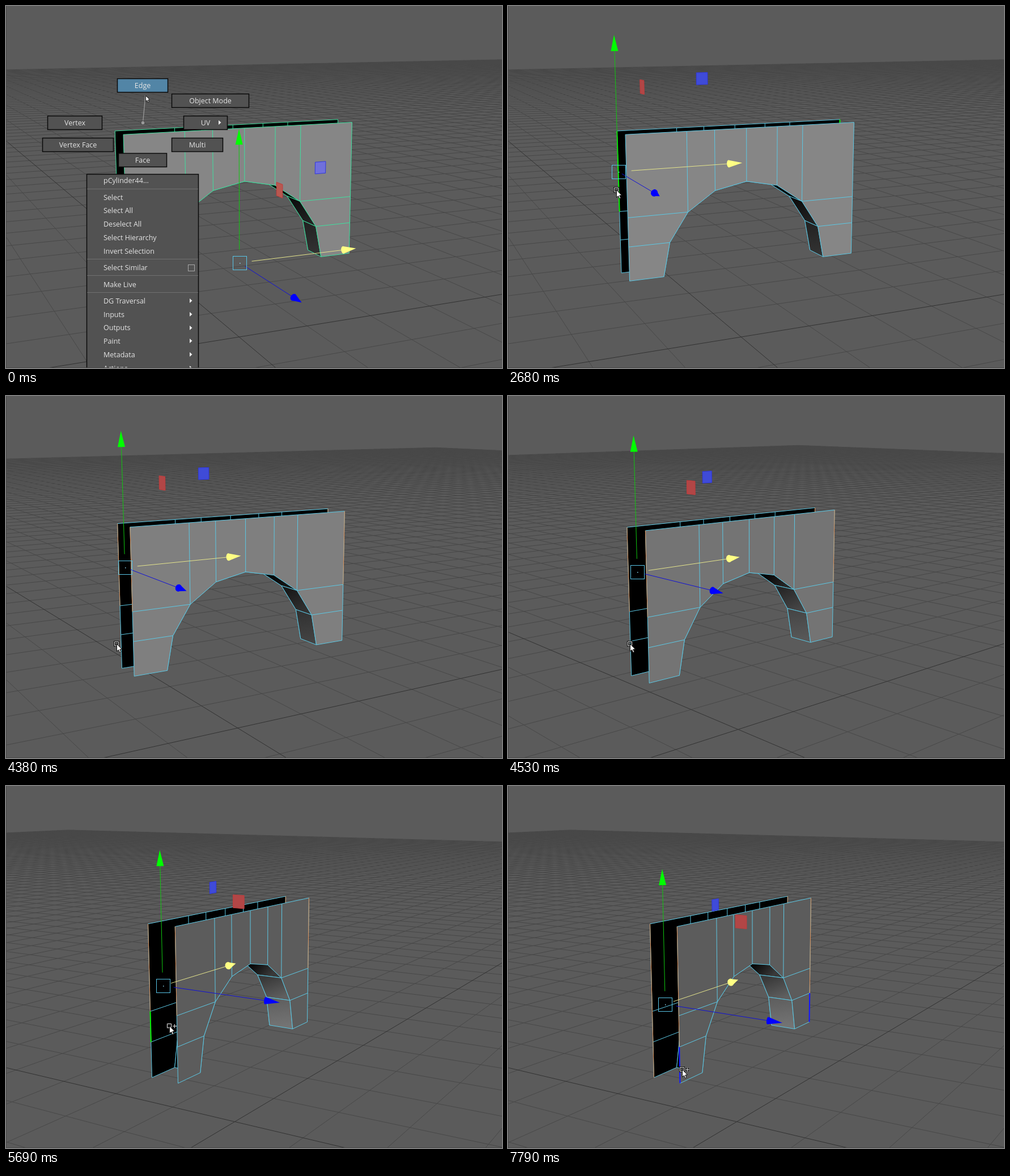
Recreate the animation shown at these times as an HTML page with a canvas. Size 875 by 640 pixels, loop 8000 ms.

```html
<!DOCTYPE html>
<html lang="en">
<head>
<meta charset="utf-8">
<title>Edge selection</title>
<style>
html, body { margin: 0; width: 875px; height: 640px; overflow: hidden; background: #5b5b5b; }
canvas { display: block; }
</style>
</head>
<body>
<canvas id="stage" width="875" height="640"></canvas>
<script>
const ctx = document.getElementById('stage').getContext('2d');
const { sin, cos, min, max, floor, round, PI } = Math;
const LOOP = 8000, MENU_END = 1230, PICK_START = 2680, ORBIT = [4140, 4680];

// World units are grid cells; points are [x, y up, w away], measured from the orbit pivot.
const FOCAL = 1482, DISTANCE = 10.42, GRID = 71, FLOOR = -2.04, ORIGIN = [-.11, .22];
const CENTER = -.14, HALF = 1.508, LEFT = CENTER - HALF, RIGHT = CENTER + HALF;
const TOP = .733, BASE = -1.01, RADIUS = 1.085;
const DEPTH = { front: -.038, back: .325 };

// Cursor strokes: start, end, x, y
const strokes = [
  [0, 0, 246, 158], [120, 390, 247, 141], [1630, 2000, 191, 325], [2830, 3340, 209, 354],
  [3610, 4000, 192, 392], [4140, 4380, 195, 438], [4530, 4680, 235, 438], [4830, 5220, 248, 425],
  [5690, 5690, 288, 424], [5840, 5840, 301, 431], [6650, 6960, 252, 490], [7510, 7790, 307, 501]
];
const hovers = [
  [0], [1750, 'front', 'top'], [1880, 'back', 'top'], [2830], [3100, 'front', 'top'], [3730],
  [5100, 'back', 'mid'], [5840, 'front', 'mid'], [6500, 'front', 'mid', '#1414ff'],
  [6650, 'back', 'inner'], [6800, 'back', 'low'], [7510, 'back', 'inner'],
  [7660, 'front', 'low'], [7790, 'front', 'low', '#1414ff']
];
const picks = [
  [PICK_START, 'back', 'top'], [3610, 'front', 'top'], [5690, 'back', 'mid'],
  [6650, 'front', 'mid'], [7360, 'back', 'low']
];

// Half of a 16-sided cylinder cut out of a block, clockwise from the top left
const range = (from, to) => Array.from({ length: Math.abs(to - from) + 1 }, (_, i) => from + i * Math.sign(to - from));
const archPoint = k => [CENTER + RADIUS * sin(k * PI / 8), BASE + RADIUS * cos(k * PI / 8)];
const sideHeights = [2, 3, 4].map(k => archPoint(k)[1]);
const outline = [
  [LEFT, TOP], ...range(-2, 2).map(k => [archPoint(k)[0], TOP]), [RIGHT, TOP],
  ...sideHeights.map(y => [RIGHT, y]),
  ...range(4, -4).map(archPoint),
  ...sideHeights.map(y => [LEFT, y]).reverse()
];
const creases = [[1, 16], [2, 15], [3, 14], [4, 13], [5, 12], [12, 7], [11, 8], [21, 16], [20, 17]];
const edgePairs = { // left edge and its mirror
  top: [[0, 21], [6, 7]], mid: [[21, 20], [7, 8]], low: [[20, 19], [8, 9]], inner: [[17, 18], [11, 10]]
};

function stepped(t, start, end) {
  if (t < start) return 0;
  const last = round((end - start) / 135);
  const step = floor((t - start) / max(1, end - start) * last + .25);
  return min(1, (step + 1) / (last + 1));
}
function cursorAt(t) {
  return strokes.reduce(([x, y], [start, end, toX, toY]) => {
    const k = stepped(t, start, end);
    return [x + (toX - x) * k, y + (toY - y) * k];
  }, [0, 0]);
}

let camera;
function setCamera(t) {
  const turn = stepped(t, ...ORBIT) ** 3;
  const yaw = (65.8 - 34.2 * turn) * PI / 180, pitch = (10.81 + .69 * turn * turn) * PI / 180;
  camera = { sy: sin(yaw), cy: cos(yaw), sp: sin(pitch), cp: cos(pitch), centerY: 318 + 3 * turn };
}
function toView([x, y, w]) {
  const { sy, cy, sp, cp } = camera;
  const ahead = x * cy + w * sy;
  return [x * sy - w * cy, y * cp + ahead * sp, DISTANCE + ahead * cp - y * sp];
}
const toScreen = ([x, y, d]) => [437 + FOCAL * x / d, camera.centerY - FOCAL * y / d];
const project = p => toScreen(toView(p));

const gray = n => `rgb(${n},${n},${n})`;
const middle = (a, b) => [(a[0] + b[0]) / 2, (a[1] + b[1]) / 2];

function path(points, close) {
  ctx.beginPath();
  points.forEach(p => ctx.lineTo(...p));
  if (close) ctx.closePath();
}
function stroke(color, width = 1) {
  ctx.strokeStyle = color;
  ctx.lineWidth = width;
  ctx.stroke();
}
function line(a, b, color, width) {
  path([a, b]);
  stroke(color, width);
}
function fill(points, color) {
  path(points, true);
  ctx.fillStyle = color;
  ctx.fill();
}

function drawGround() {
  const near = .5;
  const clip = (p, q) => {
    if (p[2] >= near) return p;
    const k = (near - p[2]) / (q[2] - p[2]);
    return p.map((n, i) => n + (q[i] - n) * k);
  };
  const addLine = (...ends) => {
    const [p, q] = ends.map(([x, w]) => toView([x + ORIGIN[0], FLOOR, w + ORIGIN[1]]));
    if (max(p[2], q[2]) < near) return;
    ctx.moveTo(...toScreen(clip(p, q)));
    ctx.lineTo(...toScreen(clip(q, p)));
  };
  const addCross = i => {
    addLine([i, -GRID], [i, GRID]);
    addLine([-GRID, i], [GRID, i]);
  };
  ctx.beginPath();
  for (let i = 1; i <= GRID; i++) {
    addCross(i);
    addCross(-i);
  }
  stroke('#484848');
  ctx.beginPath();
  addCross(0);
  stroke('#323232');
}

function drawArch(t) {
  const wire = t < MENU_END ? '#3fe0a0' : '#5cc8e4';
  const sheet = side => outline.map(([x, y]) => project([x, y, DEPTH[side]]));
  const front = sheet('front'), back = sheet('back');
  const [, hoverSide, hoverPart, hoverColor = '#00f000'] = hovers.filter(h => h[0] <= t).pop();

  const drawSheet = (points, side, color) => {
    fill(points, color);
    stroke(wire);
    creases.forEach(([a, b]) => line(points[a], points[b], wire));
    const mark = (part, markColor, width) =>
      edgePairs[part].forEach(([a, b]) => line(points[a], points[b], markColor, width));
    picks.filter(p => p[0] <= t && p[1] === side).forEach(p => mark(p[2], '#dd9058'));
    if (hoverSide === side) mark(hoverPart, hoverColor, 2);
  };
  const soffitGray = k => {
    const { sp, cp, cy } = camera;
    const facing = sin(k * PI / 8) * cy * cp - cos(k * PI / 8) * sp;
    return gray(max(0, 152 * facing - 11));
  };

  drawSheet(back, 'back', '#000');
  for (let k = -4; k < 4; k++) {
    const i = 14 - k, j = i - 1;
    const shade = ctx.createLinearGradient(...middle(back[i], front[i]), ...middle(back[j], front[j]));
    shade.addColorStop(0, soffitGray(k));
    shade.addColorStop(1, soffitGray(k + 1));
    fill([back[i], front[i], front[j], back[j]], shade);
    stroke(wire);
  }
  drawSheet(front, 'front', gray(35.5 + 108 * camera.sy));
}

// Middle of the box around the picked edges
function pickCenter(t) {
  const points = picks.filter(p => p[0] <= t).flatMap(([, side, part]) =>
    edgePairs[part][0].map(i => [...outline[i], DEPTH[side]]));
  return [0, 1, 2].map(axis => {
    const values = points.map(p => p[axis]);
    return (min(...values) + max(...values)) / 2;
  });
}

function drawGizmo(t) {
  const inObject = t < MENU_END;
  if (!inObject && t < PICK_START) return;
  const center = inObject ? [-.11, -1.03, .2] : pickCenter(t);
  const size = .1606 * toView(center)[2];
  const at = (x, y, z) => project([center[0] + x * size, center[1] + y * size, center[2] - z * size]);

  const drawHandle = (corner, color, border) => {
    const a = .625, b = .715;
    fill([corner(a, a), corner(b, a), corner(b, b), corner(a, b)], color);
    stroke(border);
  };
  const drawAxis = (axis, color, lineColor) => {
    const along = k => at(...axis.map(n => n * k));
    const [start, base, tip] = [.1, .885, 1].map(along);
    const dx = tip[0] - base[0], dy = tip[1] - base[1], length = Math.hypot(dx, dy);
    const radius = 6.5, nx = -dy / length * radius, ny = dx / length * radius;
    const flat = radius * Math.sqrt(max(0, 1 - (length / 27.5) ** 2));
    line(start, base, lineColor);
    fill([[base[0] + nx, base[1] + ny], tip, [base[0] - nx, base[1] - ny]], color);
    ctx.beginPath();
    ctx.ellipse(...base, flat, radius, Math.atan2(dy, dx), 0, 7);
    ctx.fill();
  };

  drawHandle((u, v) => at(u, v, 0), inObject ? '#7070dc' : '#3f4bd8', '#3037e0');
  drawHandle((u, v) => at(0, v, u), inObject ? '#b85850' : '#b24646', '#c23c3c');
  drawAxis([0, 0, 1], '#0000ff', '#1010d8');
  drawAxis([0, 1, 0], '#00ff00', '#10c810');
  drawAxis([1, 0, 0], '#ffff84', '#e4e48c');
  const [x, y] = project(center).map(round);
  ctx.strokeStyle = '#58c4e6';
  ctx.strokeRect(x - 11.5, y - 11.5, 24, 24);
  ctx.fillStyle = '#8fdcf4';
  ctx.fillRect(x, y, 1.5, 1.5);
}

function label(text, x, y, align = 'left') {
  ctx.font = "12.5px 'Open Sans', 'Noto Sans', sans-serif";
  ctx.textAlign = align;
  ctx.textBaseline = 'middle';
  ctx.fillStyle = '#e4e4e4';
  ctx.fillText(text, x, y + .5);
}
const submenuArrow = (x, y) => fill([[x, y - 4], [x + 4.5, y], [x, y + 4]], '#eee');

function panel(x, y, width, height, color) {
  ctx.fillStyle = color;
  ctx.fillRect(x, y, width, height);
  ctx.strokeStyle = '#0a0a0a';
  ctx.lineWidth = 1.5;
  ctx.strokeRect(x + .5, y + .5, width - 1, height - 1);
}

function drawMenus(tip) {
  const buttons = [
    ['Edge', 196, 128, 90], ['Object Mode', 292, 155, 137], ['Vertex', 73, 194, 97], ['UV', 313, 194, 78],
    ['Vertex Face', 64, 233, 126], ['Multi', 292, 233, 91], ['Face', 198, 260, 86]
  ];
  for (const [text, x, y, width] of buttons) {
    panel(x, y, width, 25, text === 'Edge' ? '#5285a6' : '#525252');
    label(text, x + width / 2, y + 13, 'center');
  }
  submenuArrow(375, 206);

  panel(142, 297, 198, 350, '#525252');
  const groups = [
    ['pCylinder44...'],
    ['Select', 'Select All', 'Deselect All', 'Select Hierarchy', 'Invert Selection'],
    ['Select Similar'],
    ['Make Live'],
    ['DG Traversal', 'Inputs', 'Outputs', 'Paint', 'Metadata', 'Actions']
  ];
  let y = 309.5;
  groups.forEach((items, group) => {
    items.forEach(text => {
      label(text, 172, y);
      if (group === 4) submenuArrow(324, round(y) - 1);
      y += 23.7;
    });
    if (group < 4) {
      ctx.fillStyle = '#707070';
      ctx.fillRect(143, round(y - 10.5), 196, 1);
    }
    y += 5.8;
  });
  ctx.strokeStyle = '#a8a8a8';
  ctx.lineWidth = 1;
  ctx.strokeRect(321.5, 457.5, 11, 11);

  line([241.5, 206], tip, '#9a9a9a', 1.3);
  ctx.beginPath();
  ctx.arc(241.5, 206.5, 3.5, 0, 7);
  ctx.fillStyle = '#999';
  ctx.fill();
  stroke('#444');
}

function outlined(trace) {
  ctx.beginPath();
  trace();
  stroke('#111', 3);
  stroke('#ddd', 1);
}

function drawCursor(x, y, t) {
  x = round(x);
  y = round(y);
  const scale = t < MENU_END ? .8 : 1;
  const adding = t >= 2980 && t < 3850 || t >= 5220;
  if (t >= MENU_END) outlined(() => ctx.rect(x - 3.5, y - 3.5, 7, 7));
  if (adding) {
    outlined(() => {
      ctx.moveTo(x + 6, y + .5);
      ctx.lineTo(x + 13, y + .5);
      ctx.moveTo(x + 9.5, y - 3);
      ctx.lineTo(x + 9.5, y + 4);
    });
  }
  const arrow = [[0, 0], [0, 13], [3, 10.2], [5.2, 15], [7.4, 14], [5.2, 9.5], [9, 9.2]];
  fill(arrow.map(([ax, ay]) => [x + .5 + ax * scale, y + .5 + ay * scale]), '#fff');
  stroke('#111');
}

function draw() {
  const t = performance.now() % LOOP;
  const tip = cursorAt(t);
  setCamera(t);
  ctx.fillStyle = '#5b5b5b';
  ctx.fillRect(0, 0, 875, 640);
  drawGround();
  drawArch(t);
  drawGizmo(t);
  if (t < MENU_END) drawMenus(tip);
  drawCursor(...tip, t);
  ctx.fillStyle = '#484848';
  ctx.fillRect(0, 0, 1, 640);
  ctx.fillRect(0, 639, 875, 1);
  requestAnimationFrame(draw);
}
draw();
</script>
</body>
</html>
```
